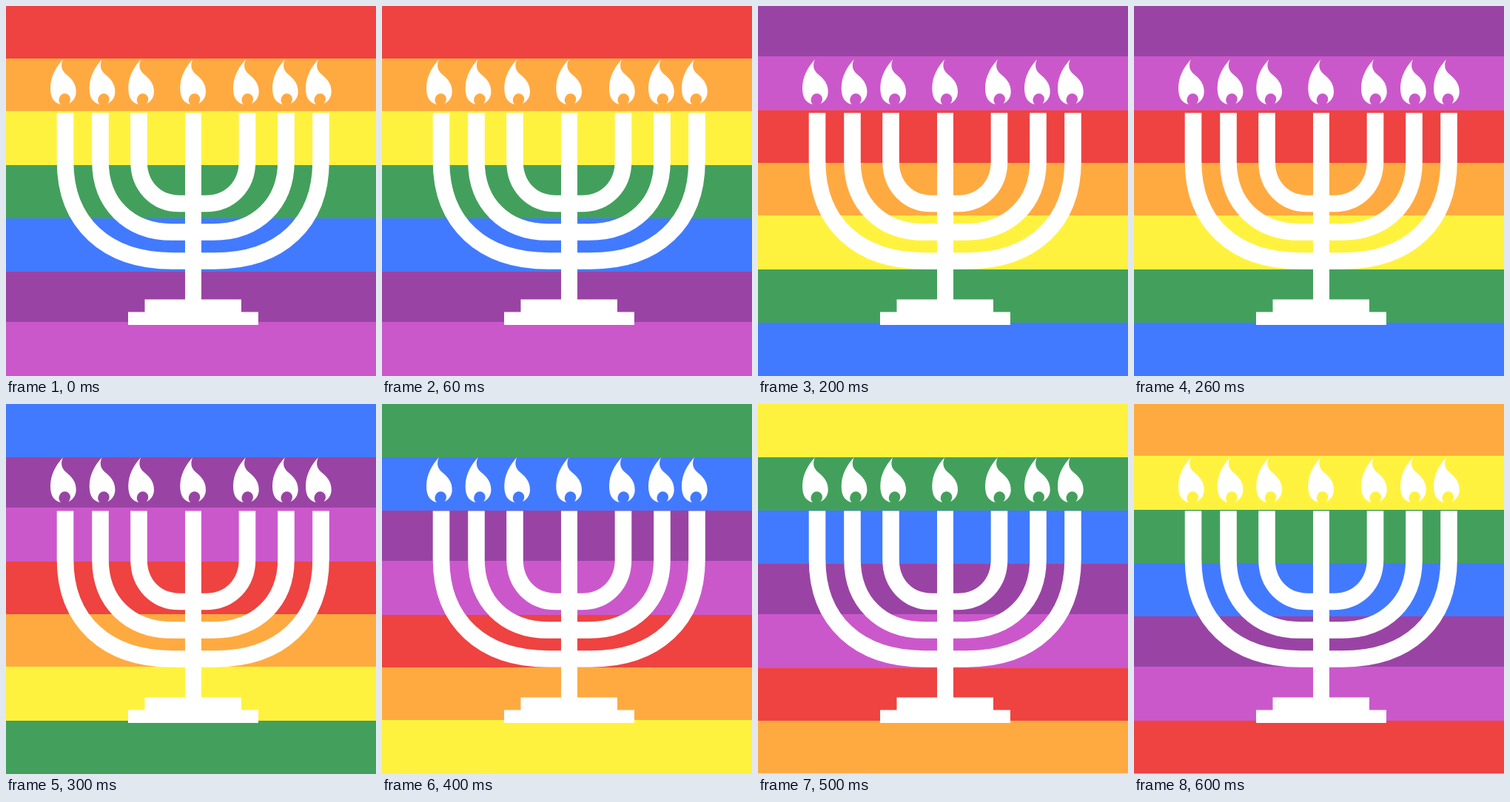
Recreate the animation shown at these times as an HTML page. Size 500x500 px, loop 700 ms.

```html
<!DOCTYPE html>
<html lang="en">
<head>
<meta charset="utf-8">
<title>Rainbow menorah</title>
<style>
  html, body { margin: 0; width: 100%; height: 100%; overflow: hidden; }

  /* One tile holds all seven stripes; it repeats and jumps down a stripe at a time. */
  #stage {
    width: 500px;
    height: 500px;
    background: linear-gradient(
      #ee4340 0 71px,
      #ffaa41 0 142px,
      #fff23f 0 215px,
      #43a05c 0 287px,
      #427aff 0 359px,
      #9944a4 0 427px,
      #cb58cb 0) 0 0 / 500px 500px repeat;
    animation: scroll 700ms step-end infinite;
  }
  @keyframes scroll {
    14.2857% { background-position-y: 73px; }
    28.5714% { background-position-y: 141px; }
    42.8571% { background-position-y: 213px; }
    57.1429% { background-position-y: 285px; }
    71.4286% { background-position-y: 357px; }
    85.7143% { background-position-y: 428px; }
  }

  svg { display: block; fill: #fff; }
  .arms { fill: none; stroke: #fff; stroke-width: 22.6; }
</style>
</head>
<body>
<div id="stage">
  <svg width="500" height="500" viewBox="0 0 500 500">
    <defs>
      <path id="flame" d="M17 0C8 10 0 23 0 39C0 52 5 59 14 61C11 58 11 54 12.5 51
        C15 44.5 24 44.5 26.5 51C27.5 54 27 57 24.5 60C31 57 34.7 51 34.7 44
        C34.7 32 28 26 21 20C14 14 14 7 17 0Z"/>
    </defs>
    <g transform="translate(0 72)">
      <use href="#flame" x="60"/>
      <use href="#flame" x="112.7"/>
      <use href="#flame" x="165.3"/>
      <use href="#flame" x="235.3"/>
      <use href="#flame" x="307"/>
      <use href="#flame" x="360"/>
      <use href="#flame" x="405"/>
    </g>
    <g class="arms">
      <path d="M80 144.5V210C80 293 135 344.5 225 344.5H282C371 344.5 425.5 293 425.5 210V144.5"/>
      <path d="M127.5 144.5V210C127.5 267 166 305.5 224.5 305.5H280C339 305.5 378.5 267 378.5 210V144.5"/>
      <path d="M179.5 144.5V210C179.5 243 202 267 234.5 267H270C303 267 326 243 326 210V144.5"/>
    </g>
    <path d="M242 144.5H264V396.5H318V413.5H341V431H165V413.5H187.5V396.5H242Z"/>
  </svg>
</div>
</body>
</html>
```
